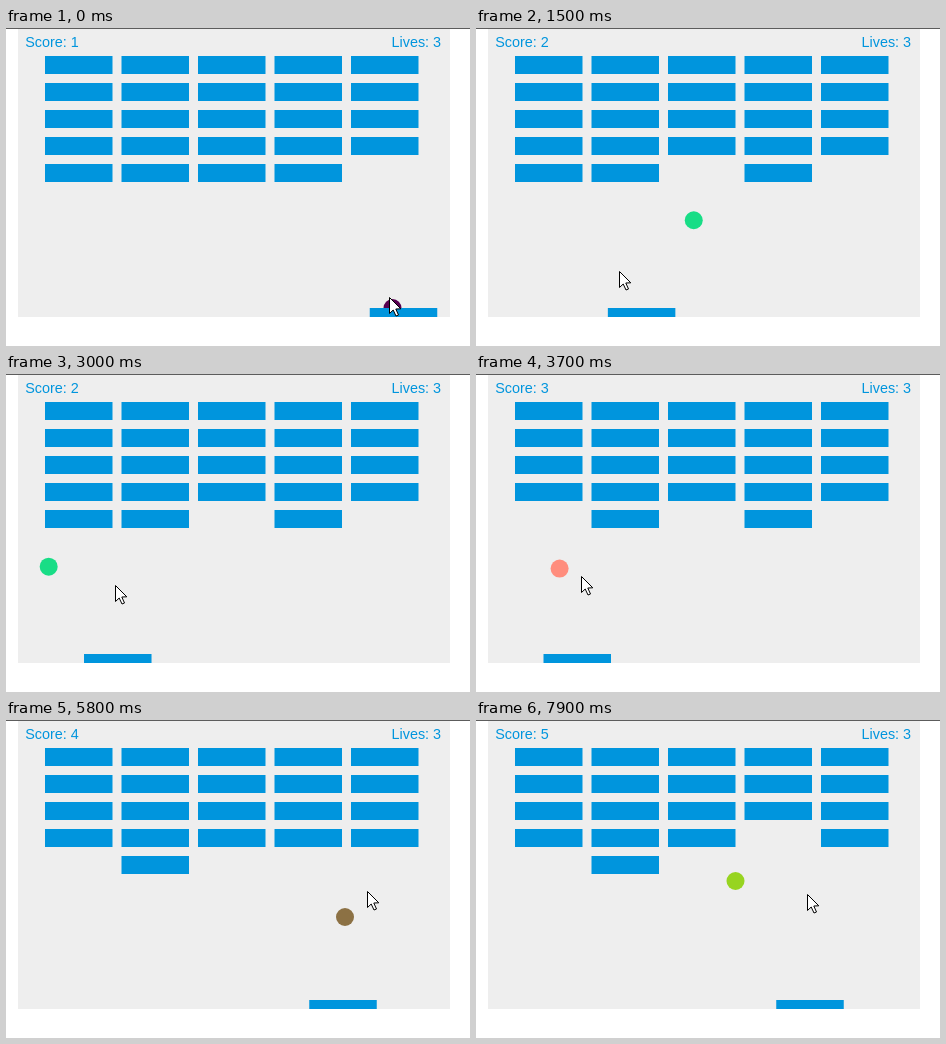
An HTML page with a canvas for the animation above (8000 ms loop, 464x318 px).

```html
<!DOCTYPE html>
<html lang="en">
<head>
<meta charset="utf-8">
<title>Breakout</title>
<style>
html, body { margin: 0; width: 464px; height: 318px; overflow: hidden; background: #fff; }
canvas { display: block; }
</style>
</head>
<body>
<canvas id="stage" width="464" height="318"></canvas>
<script>
const ctx = document.getElementById('stage').getContext('2d');
const LOOP = 8000, STEP = 100;
const BLUE = '#0095dd';
const FIELD = { x: 12, y: 1, w: 432, h: 288 };
const BRICK = { w: 67.5, h: 18, gap: 9, left: 39, top: 28 };
const PADDLE = { w: 67.5, h: 9, lag: 100 };
const RADIUS = 9;
const START_X = 386.5;
const LEFT = FIELD.x + RADIUS;
const SPAN = FIELD.w - 2 * RADIUS;
const FLOOR = FIELD.y + FIELD.h - RADIUS;

// bricks in the order they break, the height where the ball turns, its new colour
const hits = [
  { col: 2, row: 4, y: 151.75, color: '#18dd86' },
  { col: 0, row: 4, y: 151.5, color: '#ff8d7d' },
  { col: 3, row: 4, y: 153.5, color: '#8c7144' },
  { col: 3, row: 3, y: 126.25, color: '#97d420' }
];

// [time, value] key points
const travel = [[0, 0], [2200, 247.5], [4700, 548.5], [5800, 683.5], [7900, 955]];
const mouseX = [
  [-100, 397.5], [600, 297], [800, 297], [1800, 78], [2100, 129], [2200, 129],
  [3500, 97], [3700, 105.5], [4500, 187.5], [4700, 188.5], [5300, 343],
  [5700, 337], [6000, 410.5], [7200, 410.5], [7800, 334], [7900, 331]
];
const mouseY = [[0, 269], [700, 268], [2200, 221], [3700, 202], [4700, 194], [5800, 171], [7900, 174]];

function at(keys, t) {
  let i = 1;
  while (i < keys.length - 1 && keys[i][0] < t) i++;
  const [t0, v0] = keys[i - 1], [t1, v1] = keys[i];
  return v0 + (v1 - v0) * (t - t0) / (t1 - t0);
}

// The ball always runs at 45 degrees: x folds between the walls,
// y folds between the floor and the brick that is next to break.
function ballAt(s) {
  const fold = Math.abs(START_X - LEFT - s);
  const x = LEFT + SPAN - Math.abs(SPAN - fold);
  let broken = 0;
  for (const hit of hits) {
    const rise = FLOOR - hit.y;
    if (s >= rise) broken++;
    if (s < 2 * rise) return { x, y: hit.y + Math.abs(rise - s), broken };
    s -= 2 * rise;
  }
}

function rect(x, y, w, h, color) {
  ctx.fillStyle = color;
  ctx.fillRect(x, y, w, h);
}

function drawBricks(broken) {
  const gone = [{ col: 4, row: 4 }, ...hits.slice(0, broken)];
  for (let row = 0; row < 5; row++) {
    for (let col = 0; col < 5; col++) {
      if (gone.some(b => b.col === col && b.row === row)) continue;
      const x = BRICK.left + col * (BRICK.w + BRICK.gap);
      const y = BRICK.top + row * (BRICK.h + BRICK.gap);
      rect(x, y, BRICK.w, BRICK.h, BLUE);
    }
  }
}

function drawBall({ x, y, broken }) {
  ctx.fillStyle = broken ? hits[broken - 1].color : '#570050';
  ctx.beginPath();
  ctx.arc(x, y, RADIUS, 0, Math.PI * 2);
  ctx.fill();
}

function drawPointer(x, y) {
  ctx.save();
  ctx.translate(Math.floor(x) + 0.5, Math.round(y) + 0.5);
  ctx.fillStyle = '#fff';
  ctx.strokeStyle = '#000';
  const arrow = new Path2D('M0 0V16L3.7 12.5 6.5 18.5 9 17.5 6.3 11.5 11.3 11.3Z');
  ctx.fill(arrow);
  ctx.stroke(arrow);
  ctx.restore();
}

function draw(t) {
  const ball = ballAt(at(travel, t));
  const paddleX = at(mouseX, t - PADDLE.lag) - PADDLE.w / 2;

  rect(0, 0, 464, 318, '#fff');
  rect(FIELD.x, FIELD.y, FIELD.w, FIELD.h, '#eee');
  rect(0, 0, 464, 1, '#5c5c5c');

  ctx.save();
  ctx.beginPath();
  ctx.rect(FIELD.x, FIELD.y, FIELD.w, FIELD.h);
  ctx.clip();
  drawBricks(ball.broken);
  drawBall(ball);
  rect(paddleX, FIELD.y + FIELD.h - PADDLE.h, PADDLE.w, PADDLE.h, BLUE);
  ctx.fillStyle = BLUE;
  ctx.font = '14.4px "Liberation Sans", Arial, sans-serif';
  ctx.fillText('Score: ' + (ball.broken + 1), 19.2, 19);
  ctx.fillText('Lives: 3', 385.5, 19);
  ctx.restore();

  drawPointer(at(mouseX, t), at(mouseY, t));
}

function tick() {
  const t = performance.now() % LOOP;
  draw(Math.floor(t / STEP) * STEP);
  requestAnimationFrame(tick);
}
tick();
</script>
</body>
</html>
```
